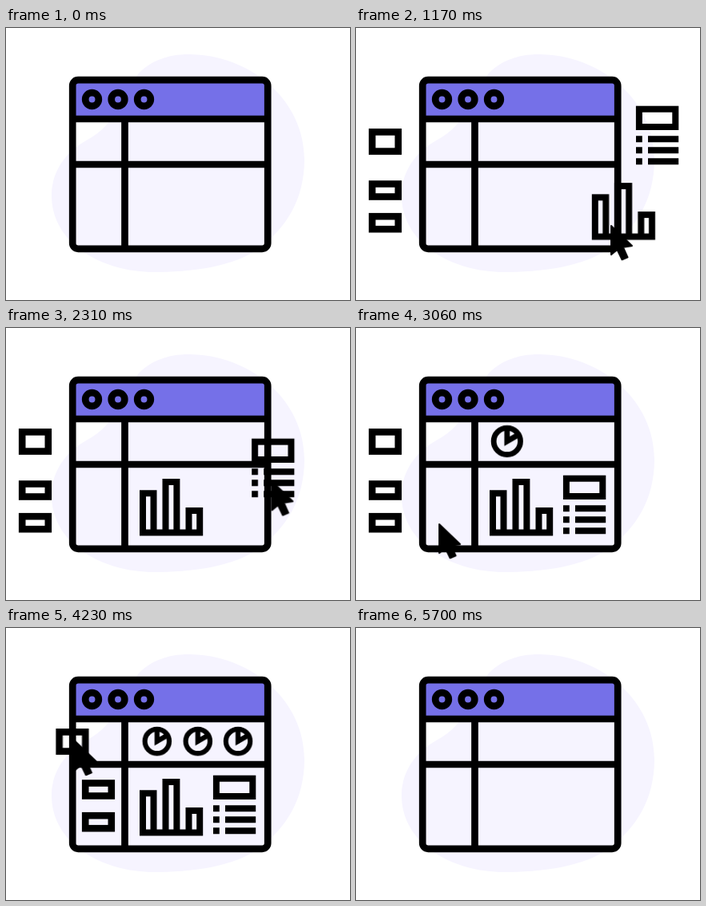
Recreate the animation shown at these times as an HTML page. Size 430x341 px, loop 6.15 s.

```html
<!DOCTYPE html>
<html lang="en">
<head>
<meta charset="utf-8">
<title>Page builder</title>
<style>
  html, body { margin: 0; width: 100%; height: 100%; overflow: hidden; background: #fff; }
  svg { display: block; width: 100vw; height: 100vh; }

  .line { fill: none; stroke: #000; }
  .anim { animation: 6150ms cubic-bezier(.37, 0, .63, 1) infinite both; }

  .parts { animation-name: show; }
  .chart { animation-name: chart; }
  .list { animation-name: list; }
  .card { animation-name: card; }
  .rows { animation-name: rows; }
  .cursor { animation-name: cursor; }
  .pie { animation-name: pop; animation-delay: calc(var(--i) * 160ms); }

  @keyframes show {
    0%, .49% { opacity: 0; }
    8.62%, 87.07% { opacity: 1; }
    92.6%, 100% { opacity: 0; }
  }
  @keyframes chart {
    0%, 14.65% { transform: translate(0, 0); }
    27.12%, 100% { transform: translate(-176px, -7px); }
  }
  @keyframes list {
    0%, 34.27% { transform: translate(0, 0); }
    41.14%, 100% { transform: translate(-91px, 87px); }
  }
  @keyframes rows {
    0%, 51.63% { transform: translate(0, 0); }
    58.05%, 100% { transform: translate(79px, -1px); }
  }
  @keyframes card {
    0%, 65.53% { transform: translate(0, 0); }
    71.41%, 100% { transform: translate(79px, 0); }
  }
  @keyframes pop {
    0%, 47.15% { transform: scale(0); }
    49.59% { transform: scale(1.1); }
    51.71%, 93% { transform: scale(1); }
    93.01%, 100% { transform: scale(0); }
  }
  @keyframes cursor {
    0%, 9.45% { transform: translate(366px, 285px); }
    13.38%, 14.65% { transform: translate(366px, 252px); }
    27.12%, 28.29% { transform: translate(191px, 234px); }
    32.6%, 34.27% { transform: translate(379px, 141px); }
    41.14% { transform: translate(278px, 248px); }
    43.74% { transform: translate(278px, 248px); animation-timing-function: cubic-bezier(.33, 0, .67, .33); }
    49.76% { transform: translate(104px, 245px); animation-timing-function: cubic-bezier(.33, .67, .67, 1); }
    51.63% { transform: translate(39px, 251px); }
    58.05% { transform: translate(118px, 250px); }
    63.41%, 65.53% { transform: translate(39px, 141px); }
    71.41%, 74.39% { transform: translate(118px, 141px); }
    82.52%, 100% { transform: translate(351px, 225px); }
  }
</style>
</head>
<body>
<svg viewBox="0 0 430 341" preserveAspectRatio="none">
  <defs>
    <g id="pie" class="line">
      <circle r="15.2" stroke-width="6.2"/>
      <path d="M0-15V0L13-7.5" stroke-width="6.2"/>
    </g>
  </defs>

  <path fill="#f6f4ff" d="M228 33C305 33 373 90 373 165C373 215 350 250 318 275C285 300 230 306 185 306C120 306 57 270 57 210C57 175 80 152 102 140C140 120 143 85 165 58C180 41 203 33 228 33Z"/>

  <!-- browser window -->
  <path fill="#7570e8" d="M83 114V71q0-6 6-6H321q6 0 6 6V114Z"/>
  <g class="line" stroke-width="8.7">
    <rect x="83.2" y="65.2" width="244" height="211.6" rx="7"/>
    <path d="M83 114H327M83 171H327M148.5 114V277"/>
    <circle cx="107.5" cy="89.5" r="8.3"/>
    <circle cx="140" cy="89.5" r="8.3"/>
    <circle cx="172.5" cy="89.5" r="8.3"/>
  </g>

  <g class="parts anim">
    <g transform="translate(188.8 142)"><use href="#pie" class="pie anim" style="--i:0"/></g>
    <g transform="translate(239.8 142)"><use href="#pie" class="pie anim" style="--i:1"/></g>
    <g transform="translate(290 142)"><use href="#pie" class="pie anim" style="--i:2"/></g>

    <g class="chart anim">
      <path class="line" stroke-width="8" d="M347 263.5V214.2H360.5V263.5M375.5 263.5V200H389.4V263.5M404.5 263.5V236H418.2V263.5M343 263.5H422.2"/>
    </g>

    <g class="list anim">
      <rect class="line" stroke-width="8" x="353.9" y="101.7" width="45.4" height="22.3"/>
      <path class="line" stroke-width="8" d="M350 139.3h7.8m7.2 0h38.2M350 153.2h7.8m7.2 0h38.2M350 167.2h7.8m7.2 0h38.2"/>
    </g>

    <g class="line" stroke-width="8.6">
      <rect class="card anim" x="20.2" y="130.4" width="32.6" height="24.2"/>
      <g class="rows anim">
        <rect x="20.2" y="195.5" width="32.6" height="16"/>
        <rect x="20.2" y="236.2" width="32.6" height="16"/>
      </g>
    </g>

    <path class="cursor anim" stroke="#000" stroke-width="2" stroke-linejoin="round" d="M1 1V37L8.5 30.8L14.5 43.3L21.5 40.3L15.8 27.7L27 26Z"/>
  </g>
</svg>
</body>
</html>
```
